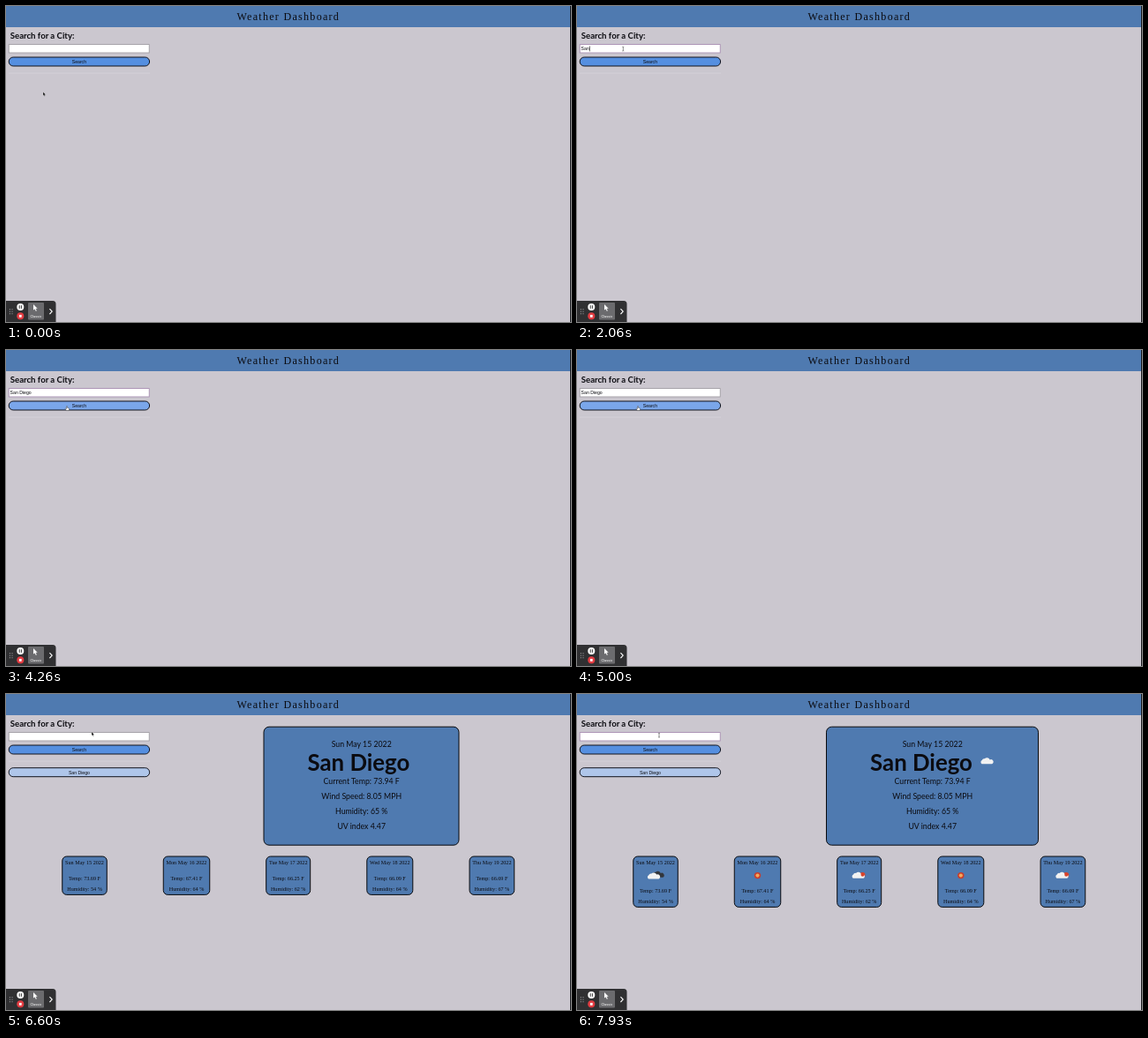
Animation of 640x358 px, one loop 8000 ms. Source, as an HTML page:

```html
<!DOCTYPE html>
<html lang="en">
<head>
<meta charset="utf-8">
<title>Weather Dashboard</title>
<style>
  html, body { margin: 0; width: 100%; height: 100%; overflow: hidden; background: #cbc7cf; }
  svg { display: block; width: 640px; height: 358px; }
  text { fill: #0b0b10; }
  .mid { text-anchor: middle; }
  .title { font: 12px "Liberation Serif", serif; letter-spacing: 1.3px; }
  .serif { font: 6.15px "Liberation Serif", serif; }
  .ui { font: 5.15px "Liberation Sans", sans-serif; }
  .round { font: 8.75px Lato, sans-serif; }
  .label { font: 700 9.6px Lato, sans-serif; }
  .city { font: 700 25.8px Lato, sans-serif; }
  .card { fill: #4f7ab0; stroke: #08090c; stroke-width: 1; }
  .button { stroke: #10131c; stroke-width: 1; }
</style>
</head>
<body>
<svg viewBox="0 0 640 358">
  <defs>
    <g id="cloud">
      <path d="M-6 3.2a2.4 2.4 0 0 1 .3-4.2a2.6 2.6 0 0 1 3-1.7a3.6 3.6 0 0 1 5.9 1.1a2.5 2.5 0 0 1 2.4 4.8z"/>
    </g>
    <g id="few-clouds">
      <circle cx="3.7" cy="-.6" r="3.1" fill="#d8432b"/>
      <circle cx="3.7" cy="-.6" r="1.5" fill="#ee8a4c"/>
      <use href="#cloud" fill="#f2f2f2" x="-1"/>
      <circle cx="3.8" cy="-.8" r="2" fill="#d8432b"/>
    </g>
    <g id="sun">
      <circle r="3.7" fill="#c93d2c"/>
      <circle r="2.1" fill="#f4a95c"/>
    </g>
    <g id="broken-clouds">
      <use href="#cloud" fill="#33363b" x="2.6" y="-1"/>
      <use href="#cloud" fill="#f2f2f2" x="-2" y=".6"/>
    </g>
  </defs>

  <rect width="640" height="358" fill="#cbc7cf"/>
  <rect width="640" height="24" fill="#4f7ab0"/>
  <text class="title" x="261.4" y="16.4">Weather Dashboard</text>

  <text class="label" x="4.8" y="37.1">Search for a City:</text>
  <rect id="input" x="3.2" y="43.6" width="159" height="9.4" fill="#fff" stroke-width=".8"/>
  <text id="typed" class="ui" x="4.6" y="50.2"></text>
  <rect id="caret" y="45.4" width=".6" height="6" fill="#111"/>
  <rect id="search" class="button" x="3.2" y="58" width="159.4" height="10" rx="5"/>
  <text class="ui mid" x="82.9" y="64.9">Search</text>
  <path d="M3 75.3H163" stroke="#bdb9c2" stroke-width=".6"/>
  <path d="M3 75.9H163" stroke="#dedbe2" stroke-width=".6"/>

  <g id="results">
    <rect class="button" x="3.2" y="83.7" width="159.4" height="10" rx="5" fill="#afc6ea"/>
    <text class="ui mid" x="82.9" y="90.6">San Diego</text>
    <rect id="today" class="card" y="37.2" height="134" rx="6"/>
    <text class="city mid" id="city" y="87.4">San Diego</text>
    <g id="lines"></g>
    <use id="today-icon" href="#cloud" fill="#f2f2f2" x="464.5" y="76"/>
    <g id="days"></g>
  </g>

  <path d="M639.5 0V358" stroke="#17191d"/>

  <g id="recorder">
    <path d="M0 334H53a3.5 3.5 0 0 1 3.5 3.5V358H0z" fill="#303032"/>
    <path d="M4.4 343.2v6M7 343.2v6" stroke="#a9a9ab" stroke-width="1" stroke-dasharray="1 1.5"/>
    <circle cx="16.3" cy="341" r="4" fill="#fff"/>
    <path d="M15.2 339.2v3.6M17.4 339.2v3.6" stroke="#222" stroke-width=".9"/>
    <circle cx="16.3" cy="351.3" r="4" fill="#e23b41"/>
    <rect x="14.9" y="349.9" width="2.8" height="2.8" fill="#fff"/>
    <rect x="25" y="336" width="18" height="19.5" rx="1" fill="#6b6b6e"/>
    <path d="M31 338v6.6l1.6-1.4 1.2 2.6 1-.5-1.2-2.5h2.1z" fill="#fff"/>
    <text class="mid" x="34" y="352.9" style="font:4px Roboto,sans-serif;fill:#fff">Classic</text>
    <path d="M49.4 343.2l2.8 2.9-2.8 2.9" fill="none" stroke="#fff" stroke-width="1.1"/>
  </g>

  <g id="pointer">
    <path id="arrow" d="M0 0V4l1-.8.7 1.5.7-.3-.7-1.5H3z" fill="#0a0a0a" stroke="#eee" stroke-width=".25"/>
    <path id="beam" d="M-.9-2.4Q0-2.4 0-1.8Q0-2.4 .9-2.4M0-1.8V1.8M-.9 2.4Q0 2.4 0 1.8Q0 2.4 .9 2.4" fill="none" stroke="#333" stroke-width=".55"/>
    <path id="hand" d="M-.5-1.3Q0-1.9 .5-1.3V.5L2.2.9Q2.8 1.1 2.6 2L2.1 3.6H-.6L-2 1.6Q-1.8.9-.5 1.6z" fill="#fff" stroke="#222" stroke-width=".4"/>
  </g>
</svg>
<script>
const LOOP = 8000, CITY = "San Diego";
const FOCUS = 930, CLICK = 4930, RESULTS = 5200, ICONS = 6870, REFOCUS = 7930;
const keyTimes = [1730, 1930, 2060, 2200, 2330, 2530, 2660, 2800, 2930];
const caretOff = [[1460, 1730], [3200, 3730], [4200, 4730]];
// time, x, y
const path = [
  [0, 42, 97.5], [60, 42, 97.5], [530, 53.5, 54.6], [730, 52.3, 48.6], [3800, 52.3, 48.6],
  [4200, 69, 65], [5400, 69, 65], [6200, 93, 46], [6560, 97, 43], [6720, 97, 43], [7060, 93, 46.8]
];
const details = [
  [60.4, "Sun May 15 2022"], [101.8, "Current Temp: 73.94 F"], [118.8, "Wind Speed: 8.05 MPH"],
  [135.8, "Humidity: 65 %"], [152.8, "UV index 4.47"]
];
// centre, width, day, temperature, humidity, icon
const forecast = [
  [89, 50.5, "Sun May 15", "73.69", 54, "broken-clouds"],
  [204.5, 52.5, "Mon May 16", "67.41", 64, "sun"],
  [319.7, 50, "Tue May 17", "66.25", 62, "few-clouds"],
  [434.8, 52, "Wed May 18", "66.09", 64, "sun"],
  [550.4, 50.7, "Thu May 19", "66.69", 67, "few-clouds"]
];

const $ = id => document.getElementById(id);
const set = (el, attrs) => { for (const k in attrs) el.setAttribute(k, attrs[k]); };
const show = (el, on) => set(el, { visibility: on ? "inherit" : "hidden" });
const text = (cls, x, y, s) => `<text class="${cls} mid" x="${x}" y="${y}">${s}</text>`;

$("lines").innerHTML = details.map(([y, s]) => text("round", 402.7, y, s)).join("");
$("days").innerHTML = forecast.map(([x, w, day, temp, hum, icon]) => `
  <rect class="card" x="${x - w / 2}" y="184" width="${w}" height="43.4" rx="5"/>
  ${text("serif", x, 192.5, day + " 2022")}
  <use class="icon" href="#${icon}" x="${x}" y="205.6"/>
  <g class="stats">${text("serif", x, 210.8, `Temp: ${temp} F`)}${text("serif", x, 222.8, `Humidity: ${hum} %`)}</g>`).join("");

const dayCards = document.querySelectorAll("#days .card");
const stats = document.querySelectorAll(".stats");
const icons = [...document.querySelectorAll(".icon"), $("today-icon")];

function pointerAt(t) {
  const i = path.findIndex(p => p[0] > t);
  if (i < 0) return path[path.length - 1].slice(1);
  const [t0, x0, y0] = path[i - 1], [t1, x1, y1] = path[i];
  const u = (t - t0) / (t1 - t0), e = u * u * (3 - 2 * u);
  return [x0 + (x1 - x0) * e, y0 + (y1 - y0) * e];
}

function render(t) {
  const [x, y] = pointerAt(t);
  const overInput = y > 43.4 && y < 53.4, overButton = y > 57.6 && y < 68.4;
  set($("pointer"), { transform: `translate(${x} ${y})` });
  show($("arrow"), !overInput && !overButton);
  show($("beam"), overInput);
  show($("hand"), overButton);
  set($("search"), { fill: overButton ? "#7aa6ea" : "#558fe0" });

  const typing = t >= FOCUS && t < CLICK;
  const count = t < RESULTS ? keyTimes.filter(k => k <= t).length : 0;
  $("typed").textContent = CITY.slice(0, count);
  set($("input"), { stroke: typing || t >= REFOCUS ? "#a184ac" : "#98959c" });
  show($("caret"), typing && !caretOff.some(([a, b]) => t >= a && t < b));
  set($("caret"), { x: 4.8 + (count ? $("typed").getComputedTextLength() : 0) });

  const loaded = t >= ICONS;
  show($("results"), t >= RESULTS);
  set($("today"), loaded ? { x: 282.5, width: 240 } : { x: 292, width: 221 });
  set($("city"), { x: loaded ? 390 : 399.4 });
  icons.forEach(el => show(el, loaded));
  dayCards.forEach(el => set(el, { height: loaded ? 57.4 : 43.4 }));
  stats.forEach(el => set(el, { transform: `translate(0 ${loaded ? 14 : 0})` }));
}

const start = performance.now();
function tick() {
  render((performance.now() - start) % LOOP);
  requestAnimationFrame(tick);
}
tick();
</script>
</body>
</html>
```
